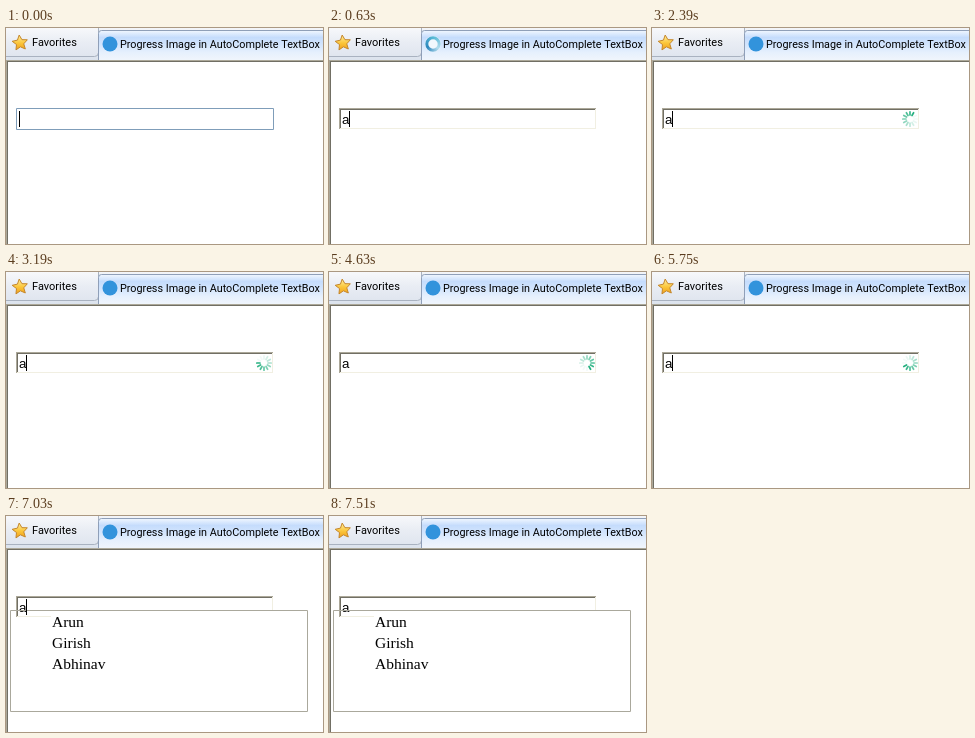
An HTML page with a canvas for the animation above (7990 ms loop, 317 by 216 pixels).

```html
<!DOCTYPE html>
<html lang="en">
<head>
<meta charset="utf-8">
<title>Progress image in a text box</title>
<style>
html, body { margin: 0; width: 100%; height: 100%; overflow: hidden; background: #fff; }
canvas { display: block; }
</style>
</head>
<body>
<canvas id="stage" width="317" height="216"></canvas>
<script>
const c = document.getElementById('stage').getContext('2d');
const LOOP = 7990, TAU = Math.PI * 2;

// start time, caret shown, tab ring angle, head spoke of the field spinner
const steps = [
  { t: 0, caret: 1, empty: 1 },
  { t: 630, caret: 1, ring: 2.6 },
  { t: 1590, caret: 0, ring: 0.9 },
  { t: 2390, caret: 1, head: 10 },
  { t: 3190, caret: 1, head: 6 },
  { t: 3990, caret: 1, head: 4 },
  { t: 4630, caret: 0, head: 2 },
  { t: 5270, caret: 1, head: 8 },
  { t: 5750, caret: 1, head: 5 },
  { t: 6390, caret: 0, head: 0 },
  { t: 7030, caret: 1, list: 1 },
  { t: 7510, caret: 0, list: 1 }
];
const names = ['Arun', 'Girish', 'Abhinav'];

function rect(x, y, w, h, fill) {
  c.fillStyle = fill;
  c.fillRect(x, y, w, h);
}
function frame(x, y, w, h, color) {
  c.strokeStyle = color;
  c.lineWidth = 1;
  c.strokeRect(x + 0.5, y + 0.5, w - 1, h - 1);
}
function text(s, x, y, font, color = '#000') {
  c.font = font;
  c.fillStyle = color;
  c.fillText(s, x, y);
}
function gradient(y0, y1, ...colors) {
  const g = c.createLinearGradient(0, y0, 0, y1);
  colors.forEach((color, i) => g.addColorStop(i / (colors.length - 1), color));
  return g;
}
function disc(x, y, r, fill) {
  c.beginPath();
  c.arc(x, y, r, 0, TAU);
  c.fillStyle = fill;
  c.fill();
}

function star(x, y, r) {
  c.beginPath();
  for (let i = 0; i < 10; i++) {
    const a = i * TAU / 10 - TAU / 4 - 0.1, d = i % 2 ? r * 0.48 : r;
    c.lineTo(x + d * Math.cos(a), y + d * Math.sin(a));
  }
  c.closePath();
  c.fillStyle = gradient(y - r, y + r, '#fff0a0', '#fbc63a', '#ee9a18');
  c.fill();
  c.strokeStyle = '#c5862a';
  c.lineWidth = 1;
  c.lineJoin = 'round';
  c.stroke();
}

function tabRing(angle) {
  const g = c.createConicGradient(angle, 104, 16);
  g.addColorStop(0, '#2b86bd');
  g.addColorStop(0.35, '#58b9d6');
  g.addColorStop(0.7, '#b5dced');
  g.addColorStop(1, '#2b86bd');
  disc(104, 16, 8, '#f2f8fd');
  c.beginPath();
  c.arc(104, 16, 6.2, 0, TAU);
  c.strokeStyle = g;
  c.lineWidth = 3;
  c.stroke();
}

function toolbar(ring) {
  rect(0, 0, 317, 32, gradient(0, 32, '#f3f5f9', '#e5eaf2', '#dce3ed'));
  c.beginPath();
  c.roundRect(-5, -5, 97.5, 33.5, 4);
  c.fillStyle = gradient(0, 28, '#f7f8fb', '#e9edf4', '#e0e6ef');
  c.fill();
  c.strokeStyle = '#a9b2c0';
  c.lineWidth = 1;
  c.stroke();

  c.beginPath();
  c.roundRect(92.5, 2.5, 240, 40, 3);
  c.fillStyle = gradient(2, 32, '#f4f9ff', '#c5dcfc', '#d3e5fd', '#e6f0fd', '#f0f5fc');
  c.fill();
  c.strokeStyle = '#8f9fb8';
  c.stroke();

  star(14, 15, 8);
  text('Favorites', 26, 18, '11px Roboto, sans-serif');
  if (ring === undefined) disc(104, 16, 7.5, '#3293dc');
  else tabRing(ring);
  text('Progress Image in AutoComplete TextBox', 114, 20, '10.8px Roboto, sans-serif');
}

function page() {
  rect(0, 32, 317, 184, '#fff');
  rect(0, 32, 317, 1, '#aca899');
  rect(0, 32, 1, 184, '#aca899');
  rect(1, 33, 316, 1, '#716f64');
  rect(1, 33, 1, 183, '#716f64');
}

function insetField() {
  frame(10, 80, 258, 22, '#fff');
  rect(10, 80, 257, 1, '#aca899');
  rect(10, 80, 1, 21, '#aca899');
  rect(11, 81, 255, 1, '#716f64');
  rect(11, 81, 1, 19, '#716f64');
  rect(11, 100, 256, 1, '#f1efe2');
  rect(266, 81, 1, 20, '#f1efe2');
}

function spinner(head) {
  c.lineWidth = 1.7;
  c.lineCap = 'round';
  for (let i = 0; i < 12; i++) {
    const a = (head - i) * TAU / 12, x = Math.cos(a), y = Math.sin(a);
    c.strokeStyle = `rgba(38, 176, 128, ${Math.max(0.06, 1 - i / 10)})`;
    c.beginPath();
    c.moveTo(258 + 4 * x, 91 + 4 * y);
    c.lineTo(258 + 7.2 * x, 91 + 7.2 * y);
    c.stroke();
  }
  c.lineCap = 'butt';
}

function suggestions() {
  rect(45, 95, 256, 63, '#fff');
  frame(4, 94, 298, 102, '#aaa89c');
  names.forEach((name, i) =>
    text(name, 46, 111 + 21 * i, '15.5px "Liberation Serif", serif'));
}

function draw(now) {
  const time = now % LOOP;
  const s = steps.findLast(step => step.t <= time);
  toolbar(s.ring);
  page();
  if (s.empty) {
    frame(10, 80, 258, 22, '#7f9db9');
  } else {
    insetField();
    text('a', 13, 96, '13.33px "Liberation Sans", sans-serif');
  }
  if (s.head !== undefined) spinner(s.head);
  if (s.list) suggestions();
  if (s.caret) rect(s.empty ? 13 : 20, 83, 1, 16, '#000');
}

const start = performance.now();
function tick() {
  draw(performance.now() - start);
  requestAnimationFrame(tick);
}
tick();
</script>
</body>
</html>
```
